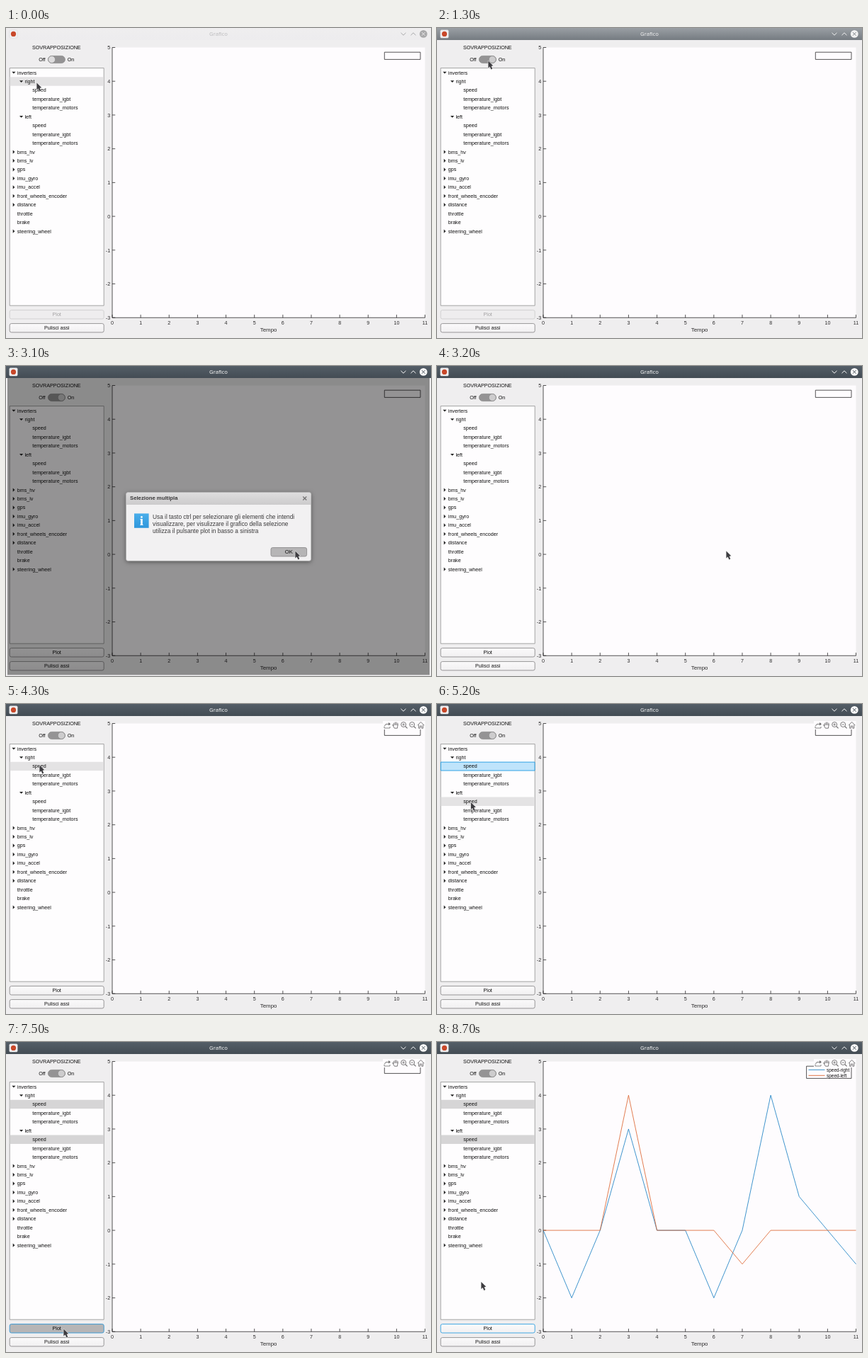
An HTML page with a canvas for the animation above (8.8 s loop, 600 by 438 pixels).

```html
<!DOCTYPE html>
<html lang="it">
<head>
<meta charset="utf-8">
<title>Grafico</title>
<style>
html, body { margin: 0; width: 100%; height: 100%; overflow: hidden; background: #efeeef; }
canvas { display: block; width: 600px; height: 438px; }
</style>
</head>
<body>
<canvas id="stage"></canvas>
<script>
const W = 600, H = 438, LOOP = 8800, STEP = 100;
const SANS = '"Liberation Sans", Arial, sans-serif';
const TITLE = '"Noto Sans", sans-serif';
const canvas = document.getElementById('stage');
const ctx = canvas.getContext('2d');
const ratio = window.devicePixelRatio || 1;
canvas.width = W * ratio;
canvas.height = H * ratio;

// label, depth, state: 'open', 'closed' or 'leaf'
const TREE = [
  ['inverters', 0, 'open'], ['right', 1, 'open'],
  ['speed', 2, 'leaf'], ['temperature_igbt', 2, 'leaf'], ['temperature_motors', 2, 'leaf'],
  ['left', 1, 'open'],
  ['speed', 2, 'leaf'], ['temperature_igbt', 2, 'leaf'], ['temperature_motors', 2, 'leaf'],
  ['bms_hv', 0, 'closed'], ['bms_lv', 0, 'closed'], ['gps', 0, 'closed'],
  ['imu_gyro', 0, 'closed'], ['imu_accel', 0, 'closed'],
  ['front_wheels_encoder', 0, 'closed'], ['distance', 0, 'closed'],
  ['throttle', 0, 'leaf'], ['brake', 0, 'leaf'], ['steering_wheel', 0, 'closed']
];
const ROW = 12.45, ROW_TOP = 56.8, INDENT = 10.7;
const RIGHT_SPEED = 2, LEFT_SPEED = 6;

const SERIES = [
  { name: 'speed-right', color: '#0072bd', from: 7900, data: [0, -2, 0, 3, 0, 0, -2, 0, 4, 1, 0, -1] },
  { name: 'speed-left', color: '#d95319', from: 8100, data: [0, 0, 0, 4, 0, 0, 0, -1, 0, 0, 0, 0] }
];

const AT = {
  toggle: 1300, dialog: 1400, okPress: 3100, closed: 3200, tools: 3700,
  firstPick: 4500, secondPick: 5500, plotPress: 7500, plotRelease: 7700
};

// Pointer stops: time, x, y
const PATH = [
  [0, 43, 77], [100, 43, 78], [500, 43, 78], [1000, 72, 46], [1400, 72, 46],
  [2100, 421, 268], [2500, 408, 261], [3600, 408, 261], [4300, 47, 86],
  [4600, 47, 86], [5200, 47.5, 138.5], [5500, 47.5, 138.5], [6300, 75, 383],
  [6800, 80, 405], [7100, 80, 405], [7300, 81, 405], [8300, 81, 405],
  [8700, 62, 338.5], [LOOP, 62, 338.5]
];

function pointerAt(t) {
  const i = Math.max(1, PATH.findIndex(p => p[0] > t));
  const [t0, x0, y0] = PATH[i - 1], [t1, x1, y1] = PATH[i];
  const k = (t - t0) / (t1 - t0), e = k * k * (3 - 2 * k);
  return { x: x0 + (x1 - x0) * e, y: y0 + (y1 - y0) * e };
}

const inside = (p, x, y, w, h) => p.x >= x && p.x < x + w && p.y >= y && p.y < y + h;

function text(str, x, y, { size = 7.15, align = 'left', color = '#111', font = SANS, weight = '' } = {}) {
  ctx.font = `${weight} ${size}px ${font}`;
  ctx.textAlign = align;
  ctx.fillStyle = color;
  ctx.fillText(str, x, y);
}

function rect(x, y, w, h, fill, stroke, radius = 0, line = 0.8) {
  ctx.beginPath();
  ctx.roundRect(x, y, w, h, radius);
  paint(fill, stroke, line);
}

function circle(x, y, r, fill, stroke, line = 0.8) {
  ctx.beginPath();
  ctx.arc(x, y, r, 0, Math.PI * 2);
  paint(fill, stroke, line);
}

function poly(points, fill, stroke, line = 0.8, close = true) {
  ctx.beginPath();
  points.forEach(([x, y]) => ctx.lineTo(x, y));
  if (close) ctx.closePath();
  paint(fill, stroke, line);
}

function paint(fill, stroke, line) {
  if (fill) { ctx.fillStyle = fill; ctx.fill(); }
  if (stroke) { ctx.strokeStyle = stroke; ctx.lineWidth = line; ctx.stroke(); }
}

const polyline = (points, color, line) => poly(points, null, color, line, false);

function vertical(y0, y1, top, bottom) {
  const g = ctx.createLinearGradient(0, y0, 0, y1);
  g.addColorStop(0, top);
  g.addColorStop(1, bottom);
  return g;
}

function cross(x, y, r, color, line) {
  polyline([[x - r, y - r], [x + r, y + r]], color, line);
  polyline([[x + r, y - r], [x - r, y + r]], color, line);
}

function titleBar(t) {
  const [top, bottom, ink, mark] =
    t < AT.toggle ? ['#efeeef', '#edecee', '#bcbcbe', '#efeeef'] :
    t < AT.dialog ? ['#9a9fa4', '#757b81', '#f2f2f2', '#7d8388'] :
    ['#545e67', '#434c54', '#fafafa', '#48525a'];
  const sign = t < AT.toggle ? '#a9a9ab' : ink;
  rect(0, 0, W, 17, vertical(0, 17, top, bottom));
  rect(4.8, 2.8, 11.4, 11.2, '#f1f0f1', '#d5d5d7', 1.5, 0.5);
  circle(10.5, 8.4, 3.6, '#c8482a');
  text('Grafico', 300, 11.2, { size: 7.7, align: 'center', color: ink, font: TITLE });
  polyline([[557.5, 6.8], [561, 10.2], [564.5, 6.8]], sign, 1);
  polyline([[571.5, 10.2], [575, 6.8], [578.5, 10.2]], sign, 1);
  circle(589.3, 8.4, 5.4, sign);
  cross(589.3, 8.4, 2.3, mark, 1);
}

function toggle(on) {
  text('SOVRAPPOSIZIONE', 71.3, 30.3, { align: 'center' });
  text('Off', 46.2, 47.1);
  text('On', 86.8, 47.1);
  rect(59.4, 39.4, 24, 10.2, '#949394', '#858485', 5.1, 0.7);
  circle(on ? 78.2 : 64.6, 44.5, 5, on ? '#cdcccd' : '#dddcdd', '#858485', 0.7);
}

function tree(t, pointer, modal) {
  rect(5.2, 56.6, 133, 335.6, '#fefdfe', '#8f8e8f');
  const hovered = !modal && inside(pointer, 5, ROW_TOP, 133, ROW * TREE.length)
    ? Math.floor((pointer.y - ROW_TOP) / ROW) : -1;
  TREE.forEach(([label, depth, state], i) => {
    const y = ROW_TOP + i * ROW, mid = y + ROW / 2, x = 10.9 + depth * INDENT;
    const picked = i === RIGHT_SPEED && t >= AT.firstPick || i === LEFT_SPEED && t >= AT.secondPick;
    if (picked && t < AT.plotPress) rect(5.4, y + 0.4, 132.6, ROW - 0.5, '#bfe4fb', '#1f9ae0', 0, 0.9);
    else if (picked) rect(5.6, y, 132.2, ROW, '#d6d5d6');
    else if (i === hovered) rect(5.6, y, 132.2, ROW, '#e4e3e4');
    if (state === 'open') poly([[x - 2.6, mid - 1.3], [x + 2.6, mid - 1.3], [x, mid + 1.4]], '#222');
    if (state === 'closed') poly([[x - 1.2, mid - 2.7], [x + 1.5, mid], [x - 1.2, mid + 2.7]], '#222');
    text(label, 15.8 + depth * INDENT, mid + 2.5);
  });
}

function button(label, x, y, w, h, { fill, border = '#8d8c8d', color = '#111', size } = {}) {
  rect(x, y, w, h, fill || vertical(y, y + h, '#fbfafb', '#f1f0f1'), border, 2.4, 0.9);
  text(label, x + w / 2, y + h / 2 + 2.5, { align: 'center', color, size });
}

function buttons(t, pointer, modal) {
  const over = !modal && inside(pointer, 5, 398.5, 133, 12.5);
  let look = {};
  if (t < AT.dialog) look = { fill: '#eeedee', border: '#cfcecf', color: '#a5a4a5' };
  else if (t >= AT.plotPress && t < AT.plotRelease) look = { fill: '#b6b5b6', border: '#2d97d6' };
  else if (t >= AT.plotRelease) look = { border: '#2d9fe0', fill: over ? '#e4e3e4' : null };
  else if (over) look = { fill: '#e4e3e4' };
  button('Plot', 5.2, 398.6, 133, 12.4, look);
  button('Pulisci assi', 5.2, 417.6, 133, 12.4);
}

const px = v => 150 + v * 40.14;
const py = v => 266.1 - v * 47.72;

function axes(t) {
  const ink = '#2b2a2b', left = px(0), right = px(11), top = py(5), bottom = py(-3);
  rect(left, top, right - left, bottom - top, '#fefcfe');
  polyline([[left, top], [left, bottom], [right, bottom]], ink, 0.8);
  for (let v = 0; v <= 11; v++) {
    polyline([[px(v), bottom], [px(v), bottom - 4.2]], ink, 0.8);
    text(v, px(v), 418.9, { align: 'center', color: ink });
  }
  for (let v = -3; v <= 5; v++) {
    polyline([[left, py(v)], [left + 4.2, py(v)]], ink, 0.8);
    text(v, 147.2, py(v) + 2.7, { align: 'right', color: ink });
  }
  text('Tempo', 370.6, 428.6, { size: 7.87, align: 'center', color: ink });
  SERIES.filter(s => t >= s.from).forEach(s =>
    polyline(s.data.map((v, i) => [px(i), py(v)]), s.color, 0.75));
  legend(t, ink);
  if (t >= AT.tools) tools();
}

function legend(t, ink) {
  if (t < SERIES[0].from) {
    rect(534.3, 34.2, 50.7, 10.2, '#fefcfe', ink);
    return;
  }
  rect(521.6, 34.2, 63.4, 17.2, '#fefcfe', ink);
  SERIES.filter(s => t >= s.from).forEach((s, i) => {
    const y = 39.3 + i * 8;
    polyline([[524.5, y], [547.5, y]], s.color, 0.8);
    text(s.name, 550, y + 2.4, { size: 6.44 });
  });
}

function tools() {
  const ink = '#6b6a6b', y = 29.8;
  rect(532, 24, 59.6, 12, '#fefcfe');
  polyline([[534, 32], [534, 34], [542, 34], [542, 32]], ink, 0.8);
  polyline([[534.2, 31.5], [536, 28.6], [541, 28.2]], ink, 0.9);
  poly([[540, 26], [543, 28.2], [540, 30.4]], ink);
  // Open hand: four fingers and a palm
  for (let i = 0; i < 4; i++) {
    const x = 547.6 + i * 1.8;
    polyline([[x, 30], [x, i % 3 ? 25.6 : 26.8]], ink, 0.9);
  }
  polyline([[547.6, 30.6], [545.6, 29.3], [548.4, 34.2], [552.4, 34.2], [553.2, 29]], ink, 0.9);
  [562, 574].forEach((x, i) => {
    circle(x - 0.8, y - 0.8, 3.5, null, ink, 0.9);
    polyline([[x + 1.8, y + 1.8], [x + 4.6, y + 4.6]], ink, 1.2);
    polyline([[x - 2.6, y - 0.8], [x + 1, y - 0.8]], ink, 0.8);
    if (i === 0) polyline([[x - 0.8, y - 2.6], [x - 0.8, y + 1]], ink, 0.8);
  });
  polyline([[581, 30.2], [585.7, 25.4], [590.4, 30.2]], ink, 0.9);
  polyline([[582.6, 29.4], [582.6, 34.2], [584.6, 34.2], [584.6, 31], [586.8, 31],
    [586.8, 34.2], [588.8, 34.2], [588.8, 29.4]], ink, 0.9);
}

function dialog(t, pointer) {
  rect(2, 17, 596, 419.5, 'rgba(0,0,0,.42)');
  ctx.save();
  ctx.shadowColor = 'rgba(0,0,0,.45)';
  ctx.shadowBlur = 6 * ratio;
  ctx.shadowOffsetY = 1.5 * ratio;
  rect(169.4, 178.4, 261.4, 97, '#f2f1f2', null, 3);
  ctx.restore();
  rect(169.4, 178.4, 261.4, 17.6, vertical(178, 196, '#dfdedf', '#cccbcc'), null, [3, 3, 0, 0]);
  rect(169.4, 178.4, 261.4, 97, null, '#a5a4a5', 3, 0.6);
  text('Selezione multipla', 175, 189.4, { size: 7.74, weight: 'bold', color: '#3a393a' });
  cross(421.8, 187, 2.5, '#777677', 1.3);
  rect(181, 208.4, 20.6, 20.4, vertical(208, 229, '#4aaeea', '#2f97dc'));
  text('i', 191.3, 225.2, { size: 19, align: 'center', color: '#fff', weight: 'bold', font: '"Liberation Serif", serif' });
  [
    'Usa il tasto ctrl per selezionare gli elementi che intendi',
    'visualizzare, per visulizzare il grafico della selezione',
    'utilizza il pulsante plot in basso a sinistra'
  ].forEach((line, i) => text(line, 207, 215.8 + i * 10.2, { size: 8.3, color: '#3a393a' }));
  const over = inside(pointer, 374, 256.5, 51, 12.5);
  const fill = t >= AT.okPress ? '#b6b5b6' : over ? '#e2e1e2' : null;
  button('OK', 374, 256.6, 50.6, 12.4, { fill, size: 7.74 });
}

function cursor({ x, y }) {
  ctx.save();
  ctx.translate(x, y);
  ctx.lineJoin = 'round';
  const arrow = [[0.4, 0.6], [0.4, 10.4], [2.6, 8.6], [4.4, 12.4], [6.2, 11.5], [4.6, 7.7], [7.2, 7.2]];
  poly(arrow, null, 'rgba(240,240,240,.85)', 1.3);
  poly(arrow, '#3d3c40');
  ctx.restore();
}

function draw(t) {
  const pointer = pointerAt(t);
  const modal = t >= AT.dialog && t < AT.closed;
  ctx.setTransform(ratio, 0, 0, ratio, 0, 0);
  rect(0, 0, W, H, '#efeeef');
  titleBar(t);
  toggle(t >= AT.toggle);
  tree(t, pointer, modal);
  buttons(t, pointer, modal);
  axes(t);
  if (modal) dialog(t, pointer);
  cursor(pointer);
}

const start = performance.now();
function tick() {
  const t = (performance.now() - start) % LOOP;
  draw(Math.floor(t / STEP) * STEP);
  requestAnimationFrame(tick);
}
tick();
</script>
</body>
</html>
```
